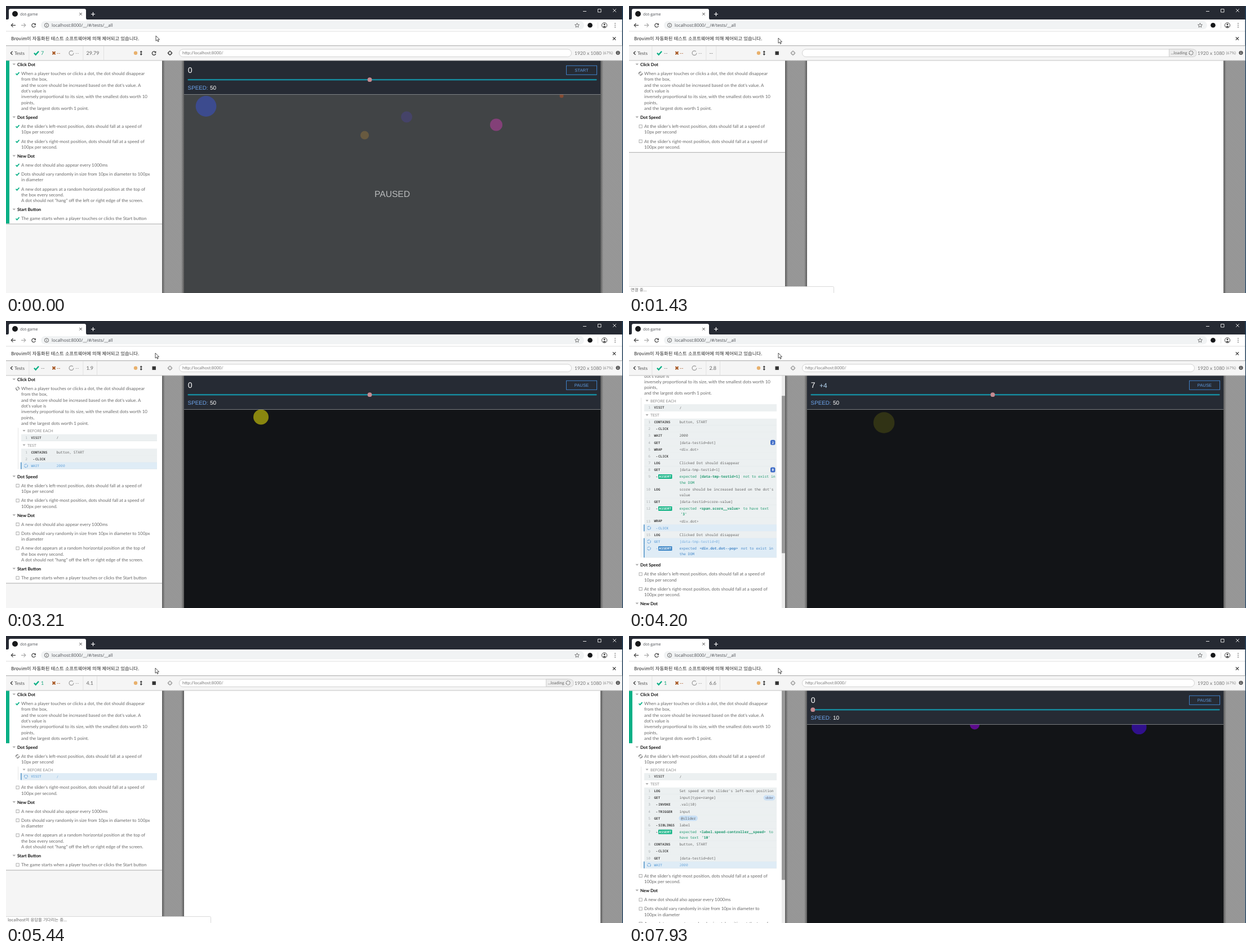
Write an HTML page that moves like this. It is 1095x511 px and loops after 8 s.

```html
<!DOCTYPE html>
<html lang="ko">
<head>
<meta charset="utf-8">
<title>dot-game</title>
<style>
html, body { margin: 0; width: 100%; height: 100%; overflow: hidden; background: #fff; }
svg { display: block; }
text { font-family: Lato, sans-serif; white-space: pre; text-rendering: geometricPrecision; }
.mono { font-family: "Noto Sans Mono", "DejaVu Sans Mono", monospace; }
.app { font-family: "Liberation Sans", Arial, sans-serif; }
.ui { font-family: "Open Sans", "Noto Sans", sans-serif; }
.kr { font-family: "Noto Sans CJK KR", "Noto Sans CJK", sans-serif; }
.bold { font-weight: 700; }
</style>
</head>
<body>
<svg id="stage" width="1095" height="511" viewBox="0 0 1095 511">
  <defs>
    <pattern id="hatch" width="3" height="3" patternUnits="userSpaceOnUse">
      <rect width="3" height="3" fill="#9d9d9d"/>
      <path d="M-1 -1L4 4M-1 2L1 4M2 -1L4 1" stroke="#858585" stroke-width=".8"/>
    </pattern>
    <linearGradient id="shade"><stop stop-color="#0006"/><stop offset="1" stop-color="#0000"/></linearGradient>
    <linearGradient id="shadeLeft"><stop stop-color="#0000"/><stop offset="1" stop-color="#0006"/></linearGradient>
    <clipPath id="below"><path d="M0 97.5H277V511H0Z"/></clipPath>
  </defs>
  <g id="frame"></g>
  <g id="scene"></g>
</svg>
<script>
const LOOP = 8000;
const RERUN = 970, READY = 1490, PASSED = 4380, LEAVE = 4430, RELOADED = 5630;
const GREEN = '#08b086';

const suites = [
  ['Click Dot', ['When a player touches or clicks a dot, the dot should disappear', 'from the box,',
    "and the score should be increased based on the dot's value. A", "dot's value is",
    'inversely proportional to its size, with the smallest dots worth 10', 'points,',
    'and the largest dots worth 1 point.']],
  ['Dot Speed',
    ["At the slider's left-most position, dots should fall at a speed of", '10px per second'],
    ["At the slider's right-most position, dots should fall at a speed of", '100px per second.']],
  ['New Dot',
    ['A new dot should also appear every 1000ms'],
    ['Dots should vary randomly in size from 10px in diameter to 100px', 'in diameter'],
    ['A new dot appears at a random horizontal position at the top of', 'the box every second.',
      'A dot should not "hang" off the left or right edge of the screen.']],
  ['Start Button', ['The game starts when a player touches or clicks the Start button']]
];

// Command rows: shown at, done at, method, message, mark on the right
const commands = [
  [['BEFORE EACH', [[1450, 1500, 'VISIT', '/']]],
   ['TEST', [
    [1510, 0, 'CONTAINS', 'button, START'],
    [1510, 1560, '-CLICK', ''],
    [1570, 3600, 'WAIT', '2000'],
    [3610, 0, 'GET', '[data-testid=dot]', '2'],
    [3640, 0, 'WRAP', '<div.dot>'],
    [3660, 3720, '-CLICK', ''],
    [3740, 0, 'LOG', 'Clicked Dot should disappear'],
    [3760, 3960, 'GET', '[data-tmp-testid=1]', '0'],
    [3760, 3960, '-ASSERT', 'expected *[data-tmp-testid=1]* not to exist in\nthe DOM'],
    [3980, 0, 'LOG', "score should be increased based on the dot's\nvalue"],
    [4000, 0, 'GET', '[data-testid=score-value]'],
    [4000, 0, '-ASSERT', "expected *<span.score__value>* to have text\n*'3'*"],
    [4040, 0, 'WRAP', '<div.dot>'],
    [4060, 4250, '-CLICK', ''],
    [4070, 0, 'LOG', 'Clicked Dot should disappear'],
    [4080, 4300, 'GET', '[data-tmp-testid=0]'],
    [4080, 4300, '-ASSERT', 'expected *<div.dot.dot--pop>* not to exist in\nthe DOM']]]],
  [['BEFORE EACH', [[4450, 5620, 'VISIT', '/']]],
   ['TEST', [
    [5640, 0, 'LOG', "Set speed at the slider's left-most position"],
    [5660, 0, 'GET', 'input[type=range]', 'slider'],
    [5700, 0, '-INVOKE', '.val(10)'],
    [5720, 0, '-TRIGGER', 'input'],
    [5750, 0, 'GET', '@slider'],
    [5770, 0, '-SIBLINGS', 'label'],
    [5770, 0, '-ASSERT', "expected *<label.speed-controller__speed>* to\nhave text *'10'*"],
    [5820, 0, 'CONTAINS', 'button, START'],
    [5840, 5960, '-CLICK', ''],
    [5860, 6920, 'GET', '[data-testid=dot]'],
    [6930, 9999, 'WAIT', '2000']]]]
];

const esc = s => s.replace(/&/g, '&amp;').replace(/</g, '&lt;');
const clamp = v => Math.max(0, Math.min(1, v));
const ramp = (t, a, b) => clamp((t - a) / (b - a));
const within = (t, a, b) => t >= a && t < b;
const rect = (x, y, w, h, fill, extra = '') =>
  `<rect x="${x}" y="${y}" width="${w}" height="${h}" fill="${fill}" ${extra}/>`;
const circle = (x, y, r, fill, extra = '') => `<circle cx="${x}" cy="${y}" r="${r}" fill="${fill}" ${extra}/>`;
const line = (d, stroke, width = 1, extra = '') =>
  `<path d="${d}" fill="none" stroke="${stroke}" stroke-width="${width}" ${extra}/>`;
const shape = (d, fill, extra = '') => `<path d="${d}" fill="${fill}" ${extra}/>`;
// y is the middle of the capital letters; *stars* mark bold parts
const text = (x, y, s, size, fill, cls = '', extra = '') => {
  const parts = s.split('*').map((p, i) =>
    i % 2 ? `<tspan class="bold" dx="1.5">${esc(p)}</tspan>` : i ? `<tspan dx="1.5">${esc(p)}</tspan>` : esc(p));
  return `<text x="${x}" y="${y + size * .36}" font-size="${size}" fill="${fill}" class="${cls}" ${extra}>${parts.join('')}</text>`;
};
const check = (x, y, k = 1) =>
  line(`M${x - 3 * k} ${y}l${2 * k} ${2.2 * k}l${4 * k} ${-4.4 * k}`, GREEN, 1.7 * k);
const cross = (x, y, r, stroke, width) =>
  line(`M${x - r} ${y - r}l${2 * r} ${2 * r}m0 ${-2 * r}l${-2 * r} ${2 * r}`, stroke, width);
const spinner = (x, y, r, stroke, t, dash = '3 1.2') =>
  circle(x, y, r, 'none', `stroke="${stroke}" stroke-width="1" stroke-dasharray="${dash}" transform="rotate(${t * .36 % 360} ${x} ${y})"`);
const reload = (x, y, r, stroke) =>
  line(`M${x + r * .8} ${y - r * .6}A${r} ${r} 0 1 0 ${x + r} ${y + r * .3}`, stroke, 1.2) +
  shape(`M${x + r + .6} ${y - r - .4}v${r}h${-r}z`, stroke);

function browser() {
  return rect(0, 0, 1095, 24, '#262a33') +
    shape('M3 24Q5 24 5 21V8Q5 5 8 5H139Q142 5 142 8V21Q142 24 144 24Z', '#fff') +
    circle(16, 14, 5, '#17181a') + text(25, 14.3, 'dot-game', 7, '#4a4d52', 'ui') +
    cross(132.5, 14.3, 2.2, '#444', 1) + line('M151 14.5h7M154.5 11v7', '#fff', 1.2) +
    line('M1024 9.5h6M1050.500 5.500h5.500v5.500h-5.500z', '#ddd') + cross(1080, 8, 2.8, '#ddd', 1) +
    rect(0, 24, 1095, 47, '#fff') + rect(62, 27, 964, 14.5, '#f1f3f4', 'rx="7.2"') +
    line('M17 34.300H9.500M12.500 31L9.200 34.300L12.500 37.600', '#444', 1.2) +
    line('M27 34.300h7.500M31.500 31L34.800 34.300L31.500 37.600', '#aaa', 1.2) + reload(49, 34.3, 3.3, '#444') +
    circle(72, 34.3, 3.6, 'none', 'stroke="#555" stroke-width=".9"') + line('M72 33.800v2.400M72 32v.9', '#555', .9) +
    text(81, 34.3, 'localhost:8000/__/#/tests/__all', 7.8, '#4a4d52', 'ui') +
    line('M1013.500 30.500l1.100 2.600l2.800.2l-2.100 1.900l.6 2.700l-2.400-1.400l-2.400 1.400l.6-2.700l-2.100-1.900l2.800-.2z', '#555', .8) +
    circle(1036.5, 34.3, 4.3, '#17181a') + rect(1050, 29, .7, 11, '#ddd') +
    circle(1062, 34.3, 4.6, 'none', 'stroke="#444"') + circle(1062, 32.8, 1.5, '#444') +
    shape('M1059 37Q1062 34 1065 37Q1062 39 1059 37Z', '#444') +
    [31, 34.3, 37.6].map(y => circle(1081, y, .8, '#444')).join('') +
    rect(0, 44.6, 1095, .8, '#d5d5d5') +
    text(9, 58, 'Brovim이 자동화된 테스트 소프트웨어에 의해 제어되고 있습니다.', 8.3, '#222', 'kr') +
    cross(1079.5, 58, 2.6, '#333', 1.2);
}

function header(t) {
  const idle = t < RERUN;
  const seconds = (t - 1310) / 1000;
  const timer = idle ? '29.79' : t < READY ? '--'
    : within(t, 5860, 5950) ? '4.61' : String(Math.floor(seconds * 10) / 10);
  const sep = timer === '--' ? 155 : 145 + timer.length * 4.5 + (idle ? 6 : 3);
  const loading = within(t, RERUN, READY) || within(t, LEAVE, RELOADED);
  const url = within(t, RERUN, READY) || within(t, LEAVE, 4700) ? '' : 'http://localhost:8000/';
  const passed = idle ? '7' : t >= PASSED ? '1' : '--';
  return rect(0, 71, 1093.5, 26, '#f5f5f5') + rect(0, 70, 1093.5, 1.2, '#b5b5b5') + rect(0, 96.5, 1093.5, 1, '#c4c4c4') +
    [41, 137, sep].map(x => rect(x - .5, 71, .8, 26, '#ddd')).join('') +
    line('M11.500 80.800L8.300 83.800L11.500 86.800', '#333', 1.2) + text(15, 83.8, 'Tests', 8.1, '#555') +
    check(54, 83.8, 1.35) + text(62, 83.8, passed, 9, passed === '--' ? '#777' : '#15a67c') +
    cross(85, 83.8, 2.5, '#a5531d', 2) + text(90, 83.8, '--', 9, '#a5531d') +
    circle(116, 83.8, 3.9, 'none', 'stroke="#999" stroke-width="1.2" stroke-dasharray="21 3.5"') +
    text(123, 83.8, '--', 9, '#999') + text(142.5, 83.8, timer, 9, '#666') +
    circle(230, 83.8, 3.2, '#e8b06c') + line('M239.800 81v6', '#333', 1.2) +
    shape('M237.500 82.300l2.300-2.800l2.300 2.800zM237.500 85.300l2.300 2.800l2.300-2.800z', '#333') +
    (t < 780 ? reload(262.5, 84, 3.3, '#333') : rect(259.5, 80.7, 6.4, 6.4, '#333')) +
    circle(291, 83.8, 3, 'none', `stroke="${idle ? '#333' : '#999'}" stroke-width="1.1"`) +
    line('M291 79.300v3M291 85.300v3M286.500 83.800h3M292.500 83.800h3', idle ? '#333' : '#999') +
    rect(307.5, 77, 696, 13.5, '#fff', 'rx="6.700" stroke="#c8c8c8" stroke-width=".8"') +
    text(313, 83.6, url, 7.5, '#777') +
    (loading ? shape('M958.500 77H1000Q1007 77 1007 83.800T1000 90.500H958.500Z', '#ececec', 'stroke="#c8c8c8" stroke-width=".8"') +
      text(961.5, 83.6, '...loading', 7.5, '#666') + spinner(997.5, 83.5, 3.5, '#555', t, '1.8 .95') : '') +
    text(1009, 83.5, '1920 x 1080', 8.5, '#777') + text(1059.5, 83.7, '(67%)', 7, '#888') +
    circle(1086, 83.3, 3.6, '#555') + line('M1086 82.800v2.600M1086 80.800v1', '#fff', 1);
}

function commandRow(row, num, y, right, t) {
  const [, done, method, message, mark] = row;
  const lines = message.split('\n'), pending = t < done;
  const child = method[0] === '-', assert = method === '-ASSERT';
  const name = child ? method.slice(1) : method;
  const ink = pending ? '#78aede' : '#444';
  const h = 12.2 + (lines.length - 1) * 10.2;
  let out = rect(27, y - 6.1, right - 27, h, pending ? '#dfecf6' : '#ecf0f1') +
    rect(27, y - 6.5 + h, right - 27, .5, '#dde2e4');
  if (pending) out += rect(26, y - 6.1, 1.5, h, '#4b8fc4') + spinner(35.5, y, 2.9, '#6da5d8', t, '4.8 1.3');
  else out += text(38, y, String(num), 6.2, '#a8adb0', 'mono', 'text-anchor="end"');
  if (child) out += text(47.5, y, '-', 6, ink, 'mono bold');
  if (assert) out += rect(52, y - 4, 24.5, 8, pending ? '#3d86c6' : '#10b384', 'rx="1"');
  out += text(child ? (assert ? 53.3 : 52) : 44.5, y, name, 6, assert ? '#fff' : ink, 'mono bold');
  if (message[0] === '@') out += rect(88.5, y - 4.8, 33.5, 9.6, '#c9e0f6', 'rx="4.800"');
  const color = assert ? (pending ? '#4688c8' : '#209a70') : pending ? '#78aede' : '#666';
  lines.forEach((s, i) =>
    out += text(message[0] === '@' ? 92 : s[0] === '*' ? 90 : 89.5, y + i * 10.2, s, 6.33, color, 'mono'));
  if (mark === 'slider') out += rect(238.5, y - 4.6, 21, 9.2, '#cbe1f6', 'rx="4.600"') +
    text(249, y, mark, 5.8, '#667', '', 'text-anchor="middle"');
  else if (mark) out += rect(251, y - 4.5, 8.5, 9, '#3f6cc7', 'rx="2.500"') +
    text(255.2, y, mark, 6, '#fff', 'mono bold', 'text-anchor="middle"');
  return out;
}

function testIcon(state, y, t) {
  if (state === 'passed') return check(20.5, y);
  if (state === 'waiting') return rect(18, y - 2.5, 5.2, 5.2, '#fff', 'stroke="#999" stroke-width=".8"');
  return spinner(20.5, y, 2.8, '#555', t, '6.8 2');
}

function layout(t, narrow) {
  const right = narrow ? 262 : 268;
  const count = t < RERUN ? 4 : t < 1200 ? 0 : t < 1460 ? 2 : 4;
  const running = t < RERUN ? 9 : t < PASSED ? 0 : 1;
  let out = '', y = 104.2, n = 0;
  for (const [title, ...tests] of suites.slice(0, count)) {
    out += shape(`M11.500 ${y - 1.7}h5.500l-2.700 3z`, '#aaa') + text(20, y, title, 7.75, '#111', 'bold');
    y += 16.1;
    for (let lines of tests) {
      const state = n < running ? 'passed' : n === running ? 'running' : 'waiting';
      if (narrow && n === 4) lines = ['Dots should vary randomly in size from 10px in diameter to', '100px in diameter'];
      out += testIcon(state, y, t);
      lines.forEach((s, i) => out += text(27, (y += i ? 10.3 : 0), s, 7.93, '#6a6a6a'));
      if (state === 'passed') out += rect(0, 97, 6, y + 8.8 - 97, GREEN);
      if (state === 'running') {
        const top = y + 8;
        let shown = false;
        for (const [label, rows] of commands[n]) {
          const visible = rows.filter(r => t >= r[0]);
          if (!visible.length) continue;
          shown = true;
          y += 13.5;
          out += shape(`M29.500 ${y - 1.7}h5l-2.500 3z`, '#aaa') + text(38, y, label, 6.8, '#888');
          visible.forEach((row, i) => {
            y += 12.15;
            out += commandRow(row, i + 1, y, right, t);
            y += (row[3].split('\n').length - 1) * 10.2;
          });
        }
        if (shown) {
          out += rect(21, top, .7, y + 6 - top, '#dcdcdc');
          y += 3.2;
        }
      }
      y += 16.1;
      n++;
    }
  }
  return { out, bottom: count ? y - 6.6 : 97, height: y - 6.6 - 97 + 31 };
}

function panel(t) {
  let list = layout(t, false);
  const narrow = list.height > 414;
  if (narrow) list = layout(t, true);
  const scroll = t < PASSED ? 53.5 * ramp(t, 3900, 4080) : 0;
  const k = 414 / list.height;
  const back = list.bottom > 97
    ? rect(0, 97, 277, list.bottom - 97, '#fff') + rect(0, list.bottom - .5, 277, 1.2, '#b8b8b8') : '';
  return rect(0, 97, 277, 414, '#f5f5f5') +
    `<g clip-path="url(#below)"><g transform="translate(0 ${-scroll})">${back}${list.out}</g></g>` +
    (narrow ? rect(271, 97, 6, 414, '#ececec') + rect(271, 97 + scroll * k, 6, 414 * k, '#999') : '') +
    rect(277, 97, 5, 414, 'url(#shade)');
}

// A dot is born with its middle on the box's top edge
function dot(t, x, r, color, born, speed, pop = 9999, still = pop) {
  if (t < born) return '';
  const grow = ramp(t, pop, pop + 170);
  const y = 158 + (Math.min(t, still) - born) / 1000 * speed * .384;
  return circle(x, y, r * (1 + grow * .53), color, `opacity="${1 - grow}"`);
}

function game(t) {
  const paused = t < RERUN;
  const frame = rect(311, 97, 5, 414, 'url(#shadeLeft)') + rect(1055, 97, 5, 414, 'url(#shade)');
  if (within(t, RERUN, READY) || within(t, LEAVE, RELOADED)) return frame + rect(316, 97, 739, 414, '#fff');
  const second = t >= RELOADED;
  const started = second ? t >= 5870 : t >= 1530;
  const speed = t >= 5720 ? 10 : 50;
  const [score, bonus] = second || t < 3720 ? ['0', ''] : t < 4070 ? ['3', '+3'] : ['7', '+4'];
  let dots;
  if (paused) dots = circle(355, 178.5, 18.4, '#3c4b8e') + circle(711, 197.5, 10, '#454368') +
    circle(870, 211.5, 11, '#834078') + circle(636.5, 230, 7.6, '#685a40') + circle(986, 160, 3.5, '#854b32') +
    text(685.5, 334.5, 'PAUSED', 15.6, '#b9bbbc', 'app', 'text-anchor="middle"');
  else if (second) dots = dot(t, 905.3, 13.2, '#30108c', 6920, 10) + dot(t, 613.5, 8.5, '#5c0c8c', 7920, 10);
  else dots = dot(t, 541, 15, '#5a2a7a', 3530, 50, 3720) + dot(t, 452.5, 13.5, '#89860f', 2530, 50, 4076, 3730);
  return frame + rect(316, 97, 739, 414, paused ? '#414446' : '#121417') + dots +
    rect(316, 97, 739, 60, '#262b34') + rect(316, 157, 739, .9, '#85898d') +
    text(322.8, 114.3, score, 14, '#fff', 'app') + text(338, 114.5, bonus, 12, '#b5d6f2', 'app') +
    rect(994.5, 106.3, 54, 16, 'none', 'stroke="#3f80c8"') +
    text(1021.4, 114, started ? 'PAUSE' : 'START', 7.7, '#5f9ce2', 'app', 'text-anchor="middle"') +
    rect(322.5, 130, 726, 2.5, '#168a9d', 'rx="1.200"') + circle(speed === 10 ? 326.3 : 645.5, 131.2, 3.9, '#c58a90') +
    text(322.6, 145.5, 'SPEED:', 9.8, '#6fa6ee', 'app') + text(362, 145.5, String(speed), 10, '#fff', 'app');
}

function status(t) {
  const first = within(t, 1000, READY);
  if (!first && !within(t, LEAVE, 6000)) return '';
  const label = first || t < 4700 ? '연결 중...' : 'localhost의 응답을 기다리는 중...';
  return `<g opacity="${1 - ramp(t, 5850, 6000)}">` +
    rect(-1, 499.5, 364.5, 13, '#fff', 'rx="2" stroke="#d0d0d0" stroke-width=".8"') +
    text(3, 505.6, label, 7.4, '#666', 'kr') + '</g>';
}

function pointer(t) {
  const down = ramp(t, 360, 590), up = ramp(t, 1110, 1300);
  const x = 266 - 4 * down + 3 * up, y = 53 + 29 * down - 25 * up;
  const tip = within(t, 560, 1110)
    ? shape('M262.500 93l3.500 3.500h-7z', '#333') + rect(232.5, 96.5, 60, 17, '#333', 'rx="2"') +
      text(262.5, 105, 'Run All Tests', 7.5, '#fff', '', 'text-anchor="middle"') : '';
  return tip + shape('M0 0V9.200L2.200 7.300L3.700 10.600L5.100 10L3.700 6.800H6.500Z', '#fff',
    `stroke="#222" stroke-width=".8" transform="translate(${x} ${y})"`);
}

const scene = document.getElementById('scene');
document.getElementById('frame').innerHTML = browser() +
  rect(277, 97, 816.5, 414, 'url(#hatch)') + rect(1093.5, 0, 1.5, 511, '#23415c');

const start = performance.now();
function draw() {
  const t = (performance.now() - start) % LOOP;
  scene.innerHTML = game(t) + panel(t) + header(t) + status(t) + pointer(t);
  requestAnimationFrame(draw);
}
draw();
</script>
</body>
</html>
```
